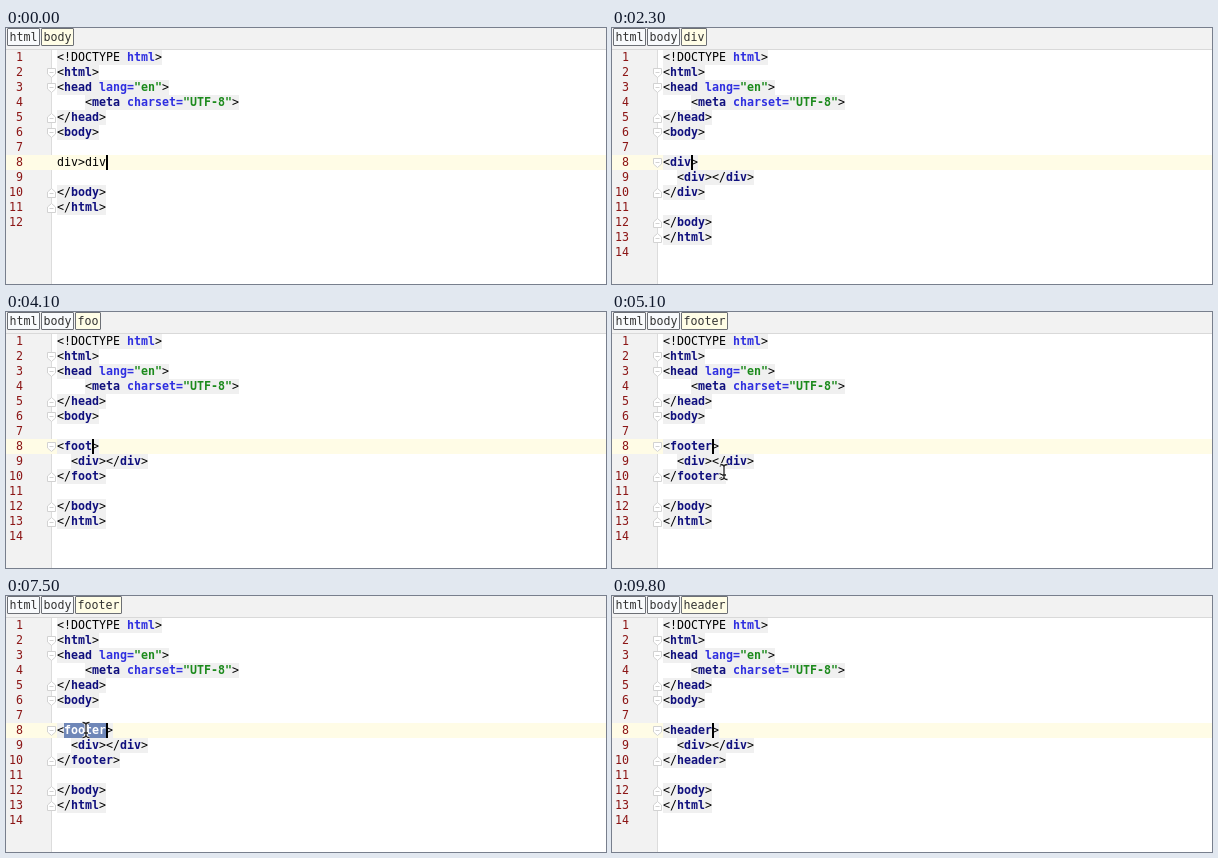
These frames come from a looping animation (600 by 256 pixels, 10000 ms). An HTML page:

```html
<!DOCTYPE html>
<html lang="en">
<head>
<meta charset="UTF-8">
<title>Live tag editing</title>
<style>
  html, body { margin: 0; width: 100%; height: 100%; overflow: hidden; background: #fff; }
  #stage {
    position: relative; width: 600px; height: 256px; overflow: hidden; background: #fff;
    font: 11.63px/15px "DejaVu Sans Mono", monospace; color: #000;
  }
  #stage > *, .num, .code, .fold, .bar { position: absolute; }
  #page { left: 0; top: 0; }
  #gutter { left: 0; top: 22px; width: 45px; height: 234px; background: #f2f2f2; border-right: 1px solid #dcdcdc; }
  #top { left: 0; top: 0; width: 600px; height: 21px; background: #f2f2f2; border-bottom: 1px solid #d9d9d9; }
  #row { left: 0; width: 600px; height: 15px; background: #fffce6; }
  #crumbs { left: 1px; top: 0; display: flex; gap: 1px; }
  .crumb {
    box-sizing: border-box; height: 18px; padding: 0 1.5px; line-height: 16px;
    border: 1px solid #6c6f75; border-radius: 1px; background: #f8fafc; color: #333;
  }
  .crumb.now { background: #fffde6; }
  .num { left: 0; width: 17px; text-align: right; color: #8c1616; }
  .code { left: 51px; height: 15px; white-space: pre; }
  .tag { display: inline-block; height: 15px; background: #f0f0f0; }
  b { color: #10107e; }
  .attr { color: #2f2fe0; }
  .str { color: #1c8a1c; }
  .sel { display: inline-block; height: 15px; background: #6f87b8; color: #fff; }
  .bar { left: 35px; width: 2px; background: #b4e6e6; }
  .bar.hot { background: #f2b49c; }
  .fold { left: 41px; width: 9px; height: 10px; fill: #fff; stroke: #d2d2d2; }
  .tint .l0 { background: #e8f5f7; }
  .tint .l1 { background: #eef5ec; }
  .tint .l2 { background: #f7f4e8; }
  .tint .l3 { background: #f8ebe8; }
  #caret { width: 2px; height: 15px; background: #000; }
  #mouse { left: -6px; top: -9px; width: 12px; height: 18px; fill: none; }
</style>
</head>
<body>
<div id="stage">
  <div id="gutter"></div>
  <div id="top"></div>
  <div id="row"></div>
  <div id="crumbs"></div>
  <div id="page"></div>
  <div id="caret"></div>
  <svg id="mouse" viewBox="-6 -9 12 18">
    <defs>
      <path id="beam" d="M-3.5-7.5Q0-7.5 0-5Q0-7.5 3.5-7.5M0-5V5M-3.5 7.5Q0 7.5 0 5Q0 7.5 3.5 7.5M-2 3H2"/>
    </defs>
    <use href="#beam" stroke="#fff" stroke-width="3"/>
    <use href="#beam" stroke="#222" stroke-width="1.3"/>
  </svg>
</div>
<script>
const LOOP = 10000, STEP = 100, LINE = 15, CHAR = 7, TOP = 22, LEFT = 51;
const EXPAND = 500, TINT = 700, CLICK = 1700, SETTLE = 1900, SELECT = 6600, RETYPE = 8300, LAG = 200;

// Tag name edits: [time, name]
const edits = [
  [0, 'div'], [2500, 'di'], [2700, 'd'], [2900, ''],
  [3500, 'f'], [3700, 'fo'], [3900, 'foo'], [4100, 'foot'], [4500, 'foote'], [4700, 'footer'],
  [8300, 'h'], [8500, 'he'], [8700, 'hea'], [8900, 'head'], [9100, 'heade'], [9300, 'header']
];

// Pointer visits: lists of [time, x, y], hidden from the last time on
const visits = [
  [[700, 112, 168], [1200, 79, 126], [1500, 79, 133], [2300, 79, 133]],
  [[5100, 112, 160], [6000, 88, 134], [6400, 80, 134], [8000, 80, 134]]
];

const $ = id => document.getElementById(id);
const lineTop = n => TOP + (n - 1) * LINE;
const nameAt = t => edits.filter(e => e[0] <= t).pop()[1];
const tag = (level, name, attrs = '') => `<span class="tag l${level}">&lt;<b>${name}</b>${attrs}&gt;</span>`;
const end = (level, name) => `<span class="tag l${level}">&lt;/<b>${name}</b>&gt;</span>`;
const attr = (key, value) => ` <b class="attr">${key}=</b><b class="str">"${value}"</b>`;

function sourceLines(t) {
  const name = nameAt(t);
  const selected = t >= SELECT && t < RETYPE;
  const shown = selected ? `<span class="sel">${name}</span>` : name;
  const middle = t < EXPAND ? ['div&gt;div'] : [
    tag(2, shown),
    '  ' + tag(3, 'div') + end(3, 'div'),
    end(2, name)
  ];
  return [
    '<span class="tag">&lt;!DOCTYPE <b class="attr">html</b>&gt;</span>',
    tag(0, 'html'),
    tag(4, 'head', attr('lang', 'en')),
    '    ' + tag(4, 'meta', attr('charset', 'UTF-8')),
    end(4, 'head'),
    tag(1, 'body'),
    '', ...middle, '',
    end(1, 'body'), end(0, 'html'), ''
  ];
}

function fold(line, closing) {
  const flip = closing ? ' transform="matrix(1 0 0 -1 0 10)"' : '';
  return `<svg class="fold" style="top:${lineTop(line) + 3}px" viewBox="0 0 9 10">` +
    `<path d="M.5.5H8.5V6L4.5 9.5L.5 6ZM2.5 4.5H6.5"${flip}/></svg>`;
}

function bar(from, to, kind = '') {
  return `<i class="bar ${kind}" style="top:${lineTop(from)}px;height:${(to - from + 1) * LINE}px"></i>`;
}

function pageMarkup(t, tinted) {
  const lines = sourceLines(t).map((code, i) => {
    const top = `style="top:${lineTop(i + 1)}px"`;
    return `<span class="num" ${top}>${i + 1}</span><span class="code" ${top}>${code}</span>`;
  });
  const open = t < EXPAND ? [2, 3, 6] : [2, 3, 6, 8];
  const close = t < EXPAND ? [5, 10, 11] : [5, 10, 12, 13];
  const bars = tinted ? bar(2, 5) + bar(13, 13) + bar(9, 9, 'hot') : '';
  return lines.join('') + bars + open.map(n => fold(n)).join('') + close.map(n => fold(n, true)).join('');
}

function crumbMarkup(t) {
  const path = ['html', 'body'];
  if (t >= TINT) path.push(nameAt(t - LAG));
  if (t >= TINT && t < SETTLE) path.push('div');
  const list = path.filter(Boolean);
  return list.map((name, i) =>
    `<span class="crumb l${i}${i === list.length - 1 ? ' now' : ''}">${name}</span>`).join('');
}

function caretAt(t) {
  if (t < EXPAND) return [8, 7];
  return t < CLICK ? [9, 7] : [8, 1 + nameAt(t).length];
}

function pointerAt(t) {
  const path = visits.find(v => t >= v[0][0] && t < v[v.length - 1][0]);
  if (!path) return null;
  const i = path.findIndex(p => p[0] > t);
  const [t0, x0, y0] = path[i - 1], [t1, x1, y1] = path[i];
  const u = (t - t0) / (t1 - t0), k = 1 - (1 - u) ** 2;
  return [x0 + (x1 - x0) * k, y0 + (y1 - y0) * k];
}

function draw(t) {
  const tinted = t >= TINT && t < SETTLE;
  $('stage').className = tinted ? 'tint' : '';
  $('page').innerHTML = pageMarkup(t, tinted);
  $('crumbs').innerHTML = crumbMarkup(t);

  const [line, column] = caretAt(t);
  $('row').style.top = $('caret').style.top = lineTop(line) + 'px';
  $('caret').style.left = LEFT + column * CHAR + 'px';

  const spot = pointerAt(t);
  $('mouse').style.display = spot ? 'block' : 'none';
  if (spot) $('mouse').style.transform = `translate(${spot[0]}px, ${spot[1]}px)`;
}

const start = performance.now();
let last = -1;
function tick() {
  const t = Math.floor((performance.now() - start) % LOOP / STEP) * STEP;
  if (t !== last) draw(last = t);
  requestAnimationFrame(tick);
}
tick();
</script>
</body>
</html>
```
